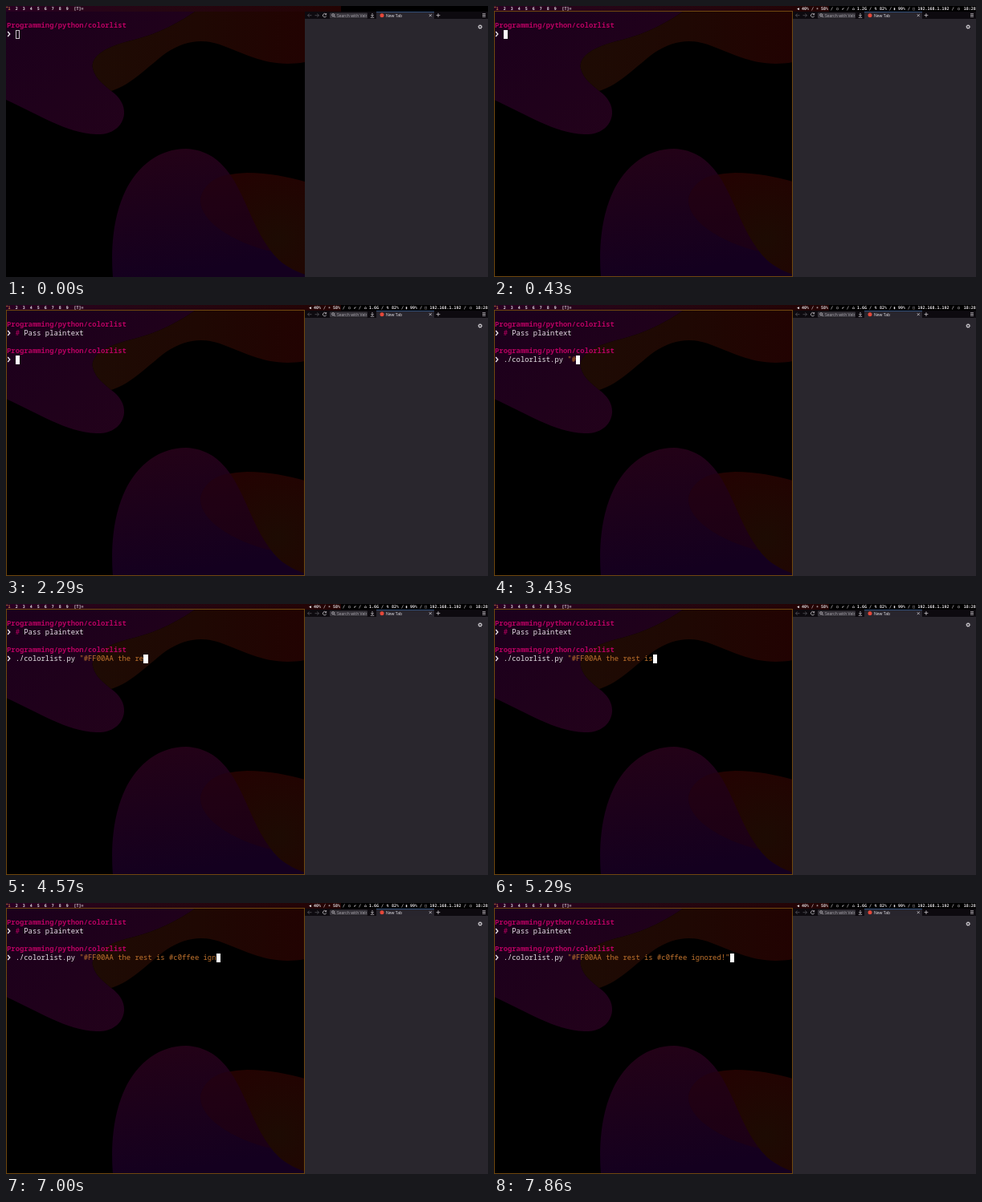
An HTML page for the animation above (8 s loop, 600 by 338 pixels).

```html
<!DOCTYPE html>
<html lang="en">
<head>
<meta charset="utf-8">
<title>Terminal session</title>
<style>
  html, body { margin: 0; width: 100%; height: 100%; overflow: hidden; background: #000; }
  #stage { position: relative; width: 600px; height: 338px; overflow: hidden; }
  svg { position: absolute; left: 0; top: 0; }
  .row {
    position: absolute; left: 1px; height: 11px; white-space: pre;
    font: 8.87px/11px "Noto Sans Mono", "DejaVu Sans Mono", monospace; color: #e8e4e8;
  }
  .cmd { left: 11.64px; }
  .path { color: #b50060; font-weight: 600; }
  .hash { color: #b50060; }
  .str { color: #c2742e; }
  #cursor { position: absolute; width: 5.3px; height: 11px; box-sizing: border-box; background: #fff; }
  #cursor.hollow { background: none; border: 1px solid #c9c4c9; }
  .bar { font: bold 5px "DejaVu Sans Mono", monospace; fill: #e4e0e4; }
  .ui { font: 5px "Noto Sans", "Open Sans", sans-serif; }
</style>
</head>
<body>
<div id="stage">
  <svg width="600" height="338" viewBox="0 0 600 338">
    <defs>
      <linearGradient id="plum" x1="0" y1="0" x2="1" y2="1">
        <stop offset="0" stop-color="#1b001c"/><stop offset="1" stop-color="#24021a"/>
      </linearGradient>
      <linearGradient id="violet" x1="0" y1="0" x2="0.25" y2="1">
        <stop offset="0" stop-color="#240216"/><stop offset="1" stop-color="#14001f"/>
      </linearGradient>
      <linearGradient id="rust" x1="0" y1="0" x2="1" y2="0">
        <stop offset="0" stop-color="#1e0b04"/><stop offset="0.5" stop-color="#1f0803"/>
        <stop offset="1" stop-color="#220302"/>
      </linearGradient>
      <radialGradient id="ember" cx="0.75" cy="0.65" r="0.7">
        <stop offset="0" stop-color="#1d0b03"/><stop offset="1" stop-color="#230302"/>
      </radialGradient>
      <linearGradient id="strip" x1="0" y1="0" x2="1" y2="0">
        <stop offset="0" stop-color="#2a0022"/><stop offset="0.4" stop-color="#260614"/>
        <stop offset="1" stop-color="#240403"/>
      </linearGradient>
      <clipPath id="field"><rect x="403" y="8" width="46" height="8"/></clipPath>
    </defs>

    <!-- wallpaper -->
    <path fill="url(#plum)" d="M0 0H245C215 22 190 34 160 42C125 50 105 62 108 78C112 92 122 98 131 106C142 114 148 124 147 135C145 152 130 161 112 160C76 159 38 134 0 117Z"/>
    <path fill="url(#rust)" d="M372 0H245C215 22 190 34 160 42C125 50 105 62 108 78C112 92 122 98 131 106C157 98 178 74 200 58C222 44 242 40 266 48C300 60 328 78 372 70Z"/>
    <path fill="url(#ember)" d="M240 240C246 218 270 209 300 208C328 208 350 213 372 219V335C340 328 300 312 270 285C252 270 238 256 240 240Z"/>
    <path fill="url(#violet)" d="M133 338C130 300 134 262 148 232C164 198 192 178 224 178C252 179 270 195 284 218C303 250 312 290 340 317C350 326 362 331 372 335V338Z"/>
    <path fill="#2a0208" opacity=".35" d="M242 240C246 222 262 212 279 210C300 240 310 280 330 306C300 300 240 275 242 240Z"/>
    <rect width="417" height="7" fill="url(#strip)"/>

    <!-- browser -->
    <rect x="372" y="7" width="228" height="331" fill="#29262d"/>
    <rect x="372" y="7" width="228" height="9" fill="#0d0a0f"/>
    <rect x="461" y="7" width="72" height="9" fill="#28252d"/>
    <rect x="461" y="7" width="72" height="1" fill="#304e78"/>
    <rect x="403" y="8.5" width="47" height="7" rx="1" fill="#37343b"/>
    <g fill="none" stroke="#c8c5ca" stroke-width=".8">
      <path stroke="#55525a" d="M380.500 11.700H375.500M377.700 9.500L375.500 11.700L377.700 13.900M384.500 11.700H389.500M387.300 9.500L389.500 11.700L387.300 13.900"/>
      <path d="M398.300 10.300A2.200 2.200 0 1 0 398.700 12.500M398.700 9V10.800H396.900"/>
      <circle cx="407.200" cy="11.300" r="1.500"/><path d="M408.300 12.500L409.800 14"/>
      <path d="M456 9V12.800M454.300 11.300L456 13L457.700 11.300M453.800 14.300H458.200"/>
      <path d="M526.800 10.200L529.800 13.200M529.800 10.200L526.800 13.200M535.600 11.600H540.400M538 9.200V14"/>
      <path d="M593 9.700H597M593 11.500H597M593 13.300H597"/>
      <circle cx="590.200" cy="26" r="1.700" stroke-width="1.200"/>
      <circle cx="590.200" cy="26" r="2.500" stroke-width=".7" stroke-dasharray="1 .96"/>
    </g>
    <circle cx="468" cy="11.700" r="2.500" fill="#e5483a"/>
    <text class="ui" x="412" y="13.600" fill="#a3a0a7" clip-path="url(#field)">Search with Velmora</text>
    <text class="ui" x="473" y="13.500" fill="#dedbe0">New Tab</text>

    <!-- top bar -->
    <g id="tags" class="bar"><rect x="0.600" y="0.800" width="1.400" height="1.400" fill="#b8783c"/></g>
    <g id="status" class="bar"></g>
    <rect id="border" x=".5" y="6.500" width="371" height="331" fill="none" stroke="#70480f"/>

    <g fill="none" stroke="#f2eff2" stroke-width="1.300">
      <path d="M2.200 32L4.800 35L2.200 38"/>
      <path id="prompt2" d="M2.200 65L4.800 68L2.200 71"/>
    </g>
  </svg>
  <div class="row path" style="top:18.5px">Programming/python/colorlist</div>
  <div class="row path" id="path2" style="top:51.5px">Programming/python/colorlist</div>
  <div id="cursor"></div>
  <div class="row cmd" style="top:29.5px"><span class="hash" id="hash"></span><span id="note"></span></div>
  <div class="row cmd" style="top:62.5px"><span id="call"></span><span class="str" id="arg"></span></div>
</div>
<script>
const LOOP = 8000, FOCUS = 140, ENTER = 2000, RAM = 1290;
const CELL = 5.32, LEFT = 1, TOP = 18.5, LINE = 11;
const NOTE = '# Pass plaintext';
const CALL = './colorlist.py ';
const COMMAND = CALL + '"#FF00AA the rest is #c0ffee ignored!"';

// [time in ms, characters typed]
const noteKeys = [[570, 1], [710, 2], [860, 3], [1000, 5], [1140, 7], [1290, 9],
  [1430, 12], [1570, 13], [1710, 15], [1860, 16]];
const commandKeys = [[2430, 1], [2570, 2], [2860, 15], [3140, 16], [3430, 17],
  [3570, 18], [3710, 20], [3860, 21], [4000, 23], [4140, 24], [4290, 26], [4430, 28], [4570, 30],
  [4710, 31], [4860, 32], [5000, 33], [5140, 34], [5290, 35], [5430, 36], [5570, 37], [5710, 38],
  [5860, 39], [6000, 40], [6140, 41], [6290, 42], [6430, 43], [6710, 44], [6860, 46], [7000, 47],
  [7140, 49], [7290, 50], [7570, 51], [7710, 52], [7860, 53]];

const $ = id => document.getElementById(id);
const typed = (keys, t) => keys.reduce((n, [at, count]) => t >= at ? count : n, 0);
const show = (id, on) => { $(id).style.visibility = on ? 'visible' : 'hidden'; };

function label(group, x, text, color) {
  const el = document.createElementNS('http://www.w3.org/2000/svg', 'text');
  el.setAttribute('x', x);
  el.setAttribute('y', 5.1);
  if (color) el.setAttribute('fill', color), el.style.fill = color;
  el.textContent = text;
  return $(group).appendChild(el);
}

for (let i = 0; i < 9; i++) label('tags', 2.6 + 9.03 * i, i + 1, i ? '' : '#d08a4c');
label('tags', 84.5, '[T]=');

[[377, '◀'], [383, '40% /'], [401, '☀'], [407, '58% /'], [426, '○'], [433, '✔ /'],
  [446, '⌂'], [467, '/'], [473.5, '↯'], [480, '82% /'], [497, '▮'], [503, '99% /'],
  [521, '□'], [527.5, '192.168.1.192 /'], [577, '○'], [584.7, '18:28']
].forEach(([x, text]) => label('status', x, text));
const ram = label('status', 452, '1.2G');

function draw(t) {
  const focused = t >= FOCUS, entered = t >= ENTER;
  const n = typed(noteKeys, t), c = typed(commandKeys, t);
  $('hash').textContent = NOTE.slice(0, Math.min(n, 1));
  $('note').textContent = NOTE.slice(1, Math.max(n, 1));
  $('call').textContent = CALL.slice(0, c);
  $('arg').textContent = COMMAND.slice(CALL.length, Math.max(c, CALL.length));
  ram.textContent = t < RAM ? '1.2G' : '1.6G';
  show('status', focused);
  show('border', focused);
  show('path2', entered);
  show('prompt2', entered);

  const cursor = $('cursor');
  cursor.className = focused ? '' : 'hollow';
  cursor.style.left = LEFT + CELL * (2 + (entered ? c : n)) + 'px';
  cursor.style.top = TOP + LINE * (entered ? 4 : 1) + 'px';
}

const start = performance.now();
function tick() {
  draw((performance.now() - start) % LOOP);
  requestAnimationFrame(tick);
}
tick();
</script>
</body>
</html>
```
